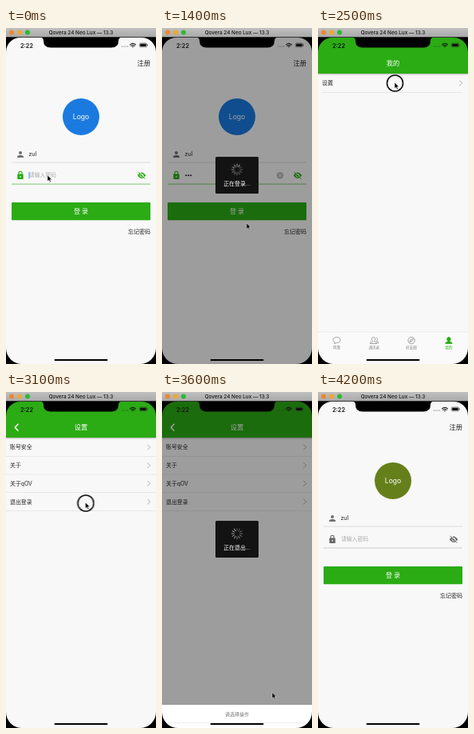
An HTML page for the animation above (4.3 s loop, 188 px wide and 420 px high).

```html
<!DOCTYPE html>
<html lang="zh-CN">
<head>
<meta charset="utf-8">
<title>Login demo</title>
<style>
html, body { margin: 0; width: 100%; height: 100%; overflow: hidden; background: #000; }
svg { display: block; width: 188px; height: 420px; }
text { font-family: Inter, "Noto Sans CJK SC", "Noto Sans CJK", sans-serif; white-space: pre; }
#spin { transform-origin: 94px 177px; }
</style>
</head>
<body>
<svg id="stage" viewBox="0 0 188 420"></svg>
<script>
const LOOP = 4300, W = 188;
const GREEN = '#2bab14', PAGE = '#f8f8f8', INK = '#222', GREY = '#707070';

// ---- drawing helpers ----
const text = (x, y, size, str, fill = INK, anchor = 'start', weight = 400) =>
  `<text x="${x}" y="${y + size * 0.36}" font-size="${size}" fill="${fill}" text-anchor="${anchor}" font-weight="${weight}">${str}</text>`;
const rect = (x, y, w, h, fill, r = 0, extra = '') =>
  `<rect x="${x}" y="${y}" width="${w}" height="${h}" rx="${r}" fill="${fill}" ${extra}/>`;
const dot = (x, y, r, fill, extra = '') => `<circle cx="${x}" cy="${y}" r="${r}" fill="${fill}" ${extra}/>`;
const line = (d, color, width = 1) =>
  `<path d="${d}" fill="none" stroke="${color}" stroke-width="${width}" stroke-linecap="round" stroke-linejoin="round"/>`;
const at = (x, y, body) => `<g transform="translate(${x} ${y})">${body}</g>`;
const group = (id, body) => `<g id="${id}">${body}</g>`;

// ---- icons, centred on 0,0 ----
const person = c => dot(0, -2.1, 2, c) + `<path d="M-4 4V2.9C-4 1.4-1.6.9 0 .9S4 1.4 4 2.9V4Z" fill="${c}"/>`;
const lock = c => line('M-2.1-1.5V-3A2.1 2.1 0 0 1 2.1-3V-1.5', c, 1.1) + rect(-3.7, -1.8, 7.4, 6.5, c, 0.9) + dot(0, 1.4, 0.9, PAGE);
const eyeOff = c =>
  `<path d="M-5.2 0Q0-7.6 5.2 0Q0 7.6-5.2 0Z" fill="${c}"/>` + dot(0, 0, 2.4, PAGE) + dot(0, 0, 1.5, c) +
  line('M-3.4-4.6L4.8 3.6', PAGE, 1) + line('M-4.2-4.2L4 4', c, 1);
const clearIcon = dot(0, 0, 4.1, '#b5b5b5') + line('M-1.5-1.5L1.5 1.5M1.5-1.5L-1.5 1.5', '#fff', 0.9);
const chevron = (y, c = '#aaa') => line(`M177.5 ${y - 3}L180.8 ${y}L177.5 ${y + 3}`, c, 0.9);

const outline = (d, c, fill = 'none') => `<path d="${d}" fill="${fill}" stroke="${c}" stroke-width=".75" stroke-linejoin="round"/>`;
const HEAD = 'M0-4C3-4 2.6 0 1.1.6V1.4L4 2.8V4H-4V2.8L-1.1 1.4V.6C-2.6 0-3-4 0-4Z';
const tabItems = [
  ['鸣笺', (c, on) => outline('M0-4C6-4 6 3 0 3L-3 4.2L-2.7 2.3C-6.3 0-4.5-4 0-4Z', c, on)],
  ['通讯录', (c, on) => at(-0.8, 0, outline(HEAD, c, on)) + outline('M2.6-3.2C5-3 4.6-.2 3.2.4V1L5.2 2.3V3.4H4', c)],
  ['好友圈', (c, on) => dot(0, 0, 4.2, on, `stroke="${c}" stroke-width=".75"`) + outline('M2.2-2.2L.9.9L-2.2 2.2L-.9-.9Z', c)],
  ['我的', (c, on) => outline(HEAD, c, on)]
];
const tabs = active => rect(0, 380, W, 40, '#fafafa') + rect(0, 379.7, W, 0.6, '#e2e2e2') +
  tabItems.map(([label, icon], i) => {
    const on = i === active, c = on ? GREEN : '#858585', x = 23.5 + i * 46.8;
    return at(x, 390.5, icon(c, on ? c : 'none')) + text(x, 399.2, 4.5, label, c, 'middle', on ? 500 : 400);
  }).join('');

// ---- screens ----
const bar = title => rect(0, 57, W, 2.4, 'url(#shade)') + rect(0, 11, W, 46, GREEN) +
  text(94, 44.5, 8.2, title, '#fff', 'middle', 500);

function login(logo, focused) {
  const c = focused ? GREEN : '#666';
  return rect(0, 11, W, 409, PAGE) +
    text(181, 44, 8.2, '注册', INK, 'end') +
    dot(94, 111, 23, logo) + text(94, 111, 8.6, 'Logo', '#fff', 'middle') +
    at(18, 158, person(GREY)) + text(28.5, 157, 7, 'zul') +
    rect(7, 167.7, 174, 0.7, '#cfcfcf') +
    at(18, 184.4, lock(c)) + at(170, 184.3, eyeOff(c)) +
    (focused ? '' : text(29, 184, 6.8, '请输入密码', '#aaa')) +
    rect(7, 194.6, 174, focused ? 1 : 0.7, focused ? '#7cc870' : '#bbb') +
    rect(7, 218, 174, 22.3, GREEN, 1) + text(94, 229.3, 8, '登 录', '#fff', 'middle', 500) +
    text(181, 254, 7, '忘记密码', INK, 'end');
}

const bullets = n => Array.from({ length: n }, (_, i) => dot(30.2 + i * 3, 184.3, 1.05, INK)).join('');
const typing = group('hint', text(29, 184, 6.8, '请输入密码', '#aaa')) +
  [1, 2, 3].map(n => group('key' + n, bullets(n - 1) + text(26 + n * 3, 184, 7, n, '#345'))).join('') +
  group('masked', bullets(3)) +
  group('clear', at(148, 184.3, clearIcon)) +
  group('caret', rect(28.6, 180, 0.9, 8.2, '#3b7de0'));

const home = rect(0, 11, W, 409, PAGE) + bar('鸣笺') +
  rect(0, 60.6, 40.5, 17, '#bbb', 1, 'opacity=".5"') + rect(0, 60, 40.5, 17, '#dadada', 1) +
  text(20, 68.4, 6.8, '跳转', INK, 'middle', 500) + tabs(0);
const mine = rect(0, 11, W, 409, PAGE) + bar('我的') +
  text(5, 69, 6.9, '设置') + chevron(69) + rect(5, 80, 176, 0.6, '#dedede') + tabs(3);

const settings = rect(0, 11, W, 409, PAGE) + bar('设置') + line('M15 40.2L11.2 44.2L15 48.2', '#fff', 1.5) +
  ['账号安全', '关于', '关于qOV', '退出登录'].map((label, i) => {
    const y = 69 + i * 22.7;
    return text(5, y, 6.9, label) + chevron(y) + rect(0, y + 11, W, 0.6, '#dcdcdc');
  }).join('');

const sheet = rect(0, 340, W, 80, '#fff') + text(94, 352, 6, '请选择操作', '#777', 'middle') +
  rect(0, 363, W, 0.6, '#e2e2e2') + text(94, 375.3, 8.2, '退出登录', '#b04046', 'middle') +
  rect(0, 386, W, 3.5, '#dcdcdc') + text(94, 400, 8.2, '取消', INK, 'middle');

const spokes = Array.from({ length: 12 }, (_, i) =>
  `<path d="M94 170.2V173.2" stroke="#fff" stroke-width=".8" stroke-linecap="round" opacity="${0.35 + i / 24}" transform="rotate(${i * 30} 94 177)"/>`).join('');
const dialog = rect(67, 161, 54, 46, '#131313', 1.5) + group('spin', spokes) +
  group('inText', text(94, 195, 6.9, '正在登录...', '#fff', 'middle')) +
  group('outText', text(94, 195, 6.9, '正在退出...', '#fff', 'middle'));

// ---- device frame ----
const wifi = line('M-3.5-1.2Q0-4.1 3.5-1.2M-2.1.4Q0-1.4 2.1.4', '#111', 1.1) + dot(0, 1.5, 0.8, '#111');
const device =
  '<path d="M0 11H188V420H0ZM18 12A18 18 0 0 0 0 30V400A20 20 0 0 0 20 420H168A20 20 0 0 0 188 400V30A18 18 0 0 0 170 12Z" fill-rule="evenodd"/>' +
  '<path d="M43 11.5Q47 12 47 16Q47 24.6 56 24.6H132Q141 24.6 141 16Q141 12 145 11.5Z"/>' +
  text(18, 22, 7.3, '2:22', '#111', 'start', 600) +
  [0, 1, 2, 3].map(i => dot(145.5 + i * 2.3, 23, 0.5, '#333')).join('') +
  at(159, 22, wifi) +
  rect(167.3, 19, 9.2, 4.8, 'none', 1.3, 'stroke="#333" stroke-width=".6"') + rect(168.1, 19.8, 7.6, 3.2, '#111', 0.7) +
  rect(177.2, 20.5, 0.8, 1.8, '#333', 0.4) +
  rect(60.5, 414, 67, 2, '#000', 1) +
  rect(0, 0, W, 11.3, 'url(#title)') +
  ['#f0862e', '#f3a72c', '#2cb935'].map((c, i) => dot(7 + i * 10, 5.5, 3, c)).join('') +
  text(94, 5.9, 6.4, 'Qovera 24 Neo Lux — 13.3', '#151515', 'middle', 500);

const pointer = group('ring', dot(0.5, 1, 10, 'none', 'stroke="#111" stroke-width="1.6"')) +
  '<path d="M0 0V7.6L1.8 6L3 8.8L4.3 8.2L3.1 5.5H5.5Z" fill="#000" stroke="#fff" stroke-width=".5"/>';

const fade = (id, a, b) => `<linearGradient id="${id}" x2="0" y2="1"><stop ${a}/><stop offset="1" ${b}/></linearGradient>`;
document.getElementById('stage').innerHTML =
  '<defs>' + fade('title', 'stop-color="#c0c0c0"', 'stop-color="#a9a9a9"') +
  fade('shade', 'stop-opacity=".25"', 'stop-opacity="0"') + '</defs>' +
  group('first', login('#1a7ae0', true) + typing) +
  group('main', home + group('mine', mine)) +
  group('settings', settings) +
  group('barrier', rect(0, 11, W, 409, '#000')) +
  group('sheet', sheet) +
  group('dialog', dialog) +
  group('last', login('#657f1a', false)) +
  device + group('pointer', pointer);

// ---- motion: every track is [ms, value] pairs, sampled ten times a second ----
const clock = document.timeline.currentTime || performance.now();

function track(id, prop, steps, easing = 'linear') {
  const frames = steps.map(([ms, v]) => ({ offset: ms / LOOP, [prop]: v, easing }));
  if (steps[0][0] > 0) frames.unshift({ ...frames[0], offset: 0 });
  frames.push({ ...frames[frames.length - 1], offset: 1 });
  const a = document.getElementById(id).animate(frames, { duration: LOOP, iterations: Infinity, easing: 'steps(43, end)' });
  a.startTime = clock - 5;
}
// Visible only inside the given [from, to] spans.
function show(id, ...spans) {
  const steps = [[0, 0]];
  for (const [from, to] of spans) {
    if (from <= 0) steps[0][1] = 1; else steps.push([from - 20, 1]);
    if (to < LOOP) steps.push([to - 20, 0]);
  }
  track(id, 'opacity', steps, 'step-end');
}
const move = (id, steps, easing) =>
  track(id, 'transform', steps.map(([ms, x, y = 0]) => [ms, `translate(${x}px, ${y}px)`]), easing);

show('hint', [0, 300]);
show('key1', [300, 500]);
show('key2', [500, 700]);
show('key3', [700, 900]);
show('masked', [900, LOOP]);
show('clear', [300, LOOP]);
show('caret', [0, 1300]);
move('caret', [[0, 0], [280, 4.2], [480, 7.3], [680, 10.4], [880, 9.2]], 'step-end');

move('main', [[1500, W], [1700, 0], [2600, 0], [2900, -60]], 'ease-out');
show('mine', [2200, LOOP]);
move('settings', [[2600, W], [2900, 0]], 'ease-out');
move('sheet', [[3100, 0, 80], [3200, 0, 26], [3300, 0, 0], [3400, 0, 0], [3500, 0, 16], [3600, 0, 50.5], [3700, 0, 80]]);
move('last', [[3900, W], [4100, 0]], 'ease-out');

track('barrier', 'opacity', [[1200, 0], [1300, .37], [1500, .37], [1600, 0], [3100, 0], [3200, .4],
  [3300, .61], [3400, .61], [3500, .5], [3600, .37], [3900, .37], [4000, 0]]);
show('dialog', [1300, 1600], [3500, 4000]);
show('inText', [0, 2000]);
show('outText', [2000, LOOP]);
track('spin', 'transform', [[0, 'rotate(0deg)'], [4299, 'rotate(1290deg)']]);

move('pointer', [[0, 52, 184], [300, 52, 187], [900, 52, 187], [1100, 92, 228], [1300, 92, 228],
  [1800, 161, 306.5], [2100, 164, 388], [2200, 164, 388], [2450, 96, 68], [2600, 96, 68],
  [3000, 99.5, 138], [3100, 99.5, 138], [3300, 147, 369], [3400, 147, 370], [3600, 138, 375.5], [3900, 138, 426]]);
show('ring', [1200, 1300], [2100, 2200], [2500, 2600], [3100, 3200], [3400, 3500]);
</script>
</body>
</html>
```
